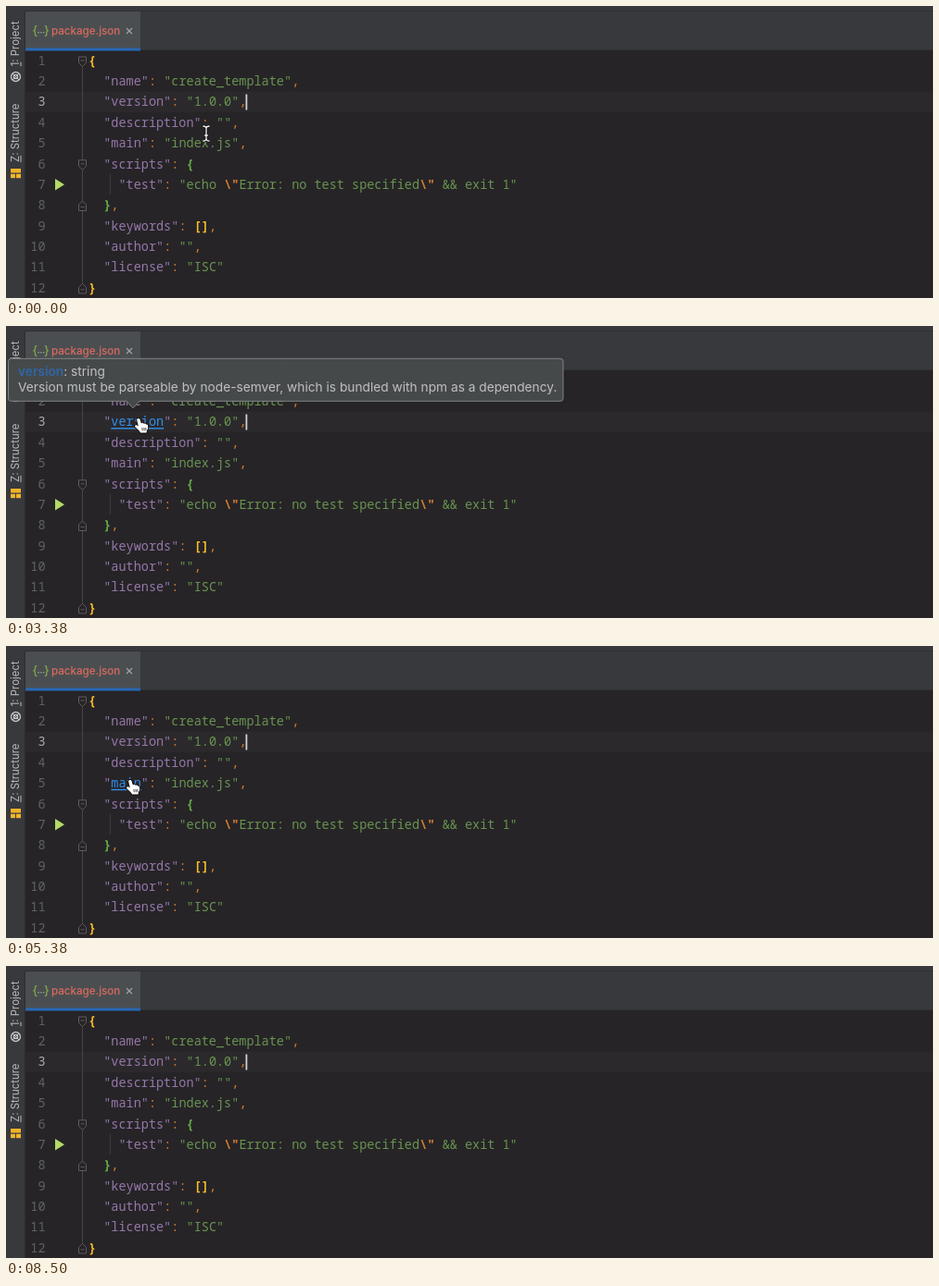
Animation, 1000 px wide and 316 px high, one loop 8.62 s. Source, as an HTML page with a canvas:

```html
<!DOCTYPE html>
<html lang="en">
<head>
<meta charset="utf-8">
<title>package.json</title>
<style>
html, body { margin: 0; width: 100%; height: 100%; overflow: hidden; background: #262427; }
canvas { display: block; width: 1000px; height: 316px; }
</style>
</head>
<body>
<canvas id="stage"></canvas>
<script>
const W = 1000, H = 316, LOOP = 8620, STEP = 125;
const COL0 = 89, PITCH = 8.12;
const mono = weight => `${weight} 13.53px "Noto Sans Mono", "DejaVu Sans Mono", monospace`;
const ui = (size, weight = 400) => `${weight} ${size}px Inter, Roboto, sans-serif`;

const C = {
  editor: '#262427', row: '#2b292c', panel: '#37393c', tab: '#4b4e51', edge: '#2b2c2e',
  accent: '#2668b5', key: '#9677aa', str: '#699450', punct: '#d47b30', gold: '#f5b92a',
  inner: '#63ab48', link: '#3190ec', num: '#606266', numOn: '#a9a9aa', fold: '#5c5b5e',
  side: '#b9bbbd', icon: '#c3c5c7', block: '#f0b429', tip: '#46494a', tipEdge: '#808283',
  tipKey: '#2e67a8', tipText: '#bfc0c1'
};

const LINES = [
  '{',
  '  "name": "create_template",',
  '  "version": "1.0.0",',
  '  "description": "",',
  '  "main": "index.js",',
  '  "scripts": {',
  '    "test": "echo \\"Error: no test specified\\" && exit 1"',
  '  },',
  '  "keywords": [],',
  '  "author": "",',
  '  "license": "ISC"',
  '}'
];

// Hovered keys: link time span, popup time span, popup geometry
const HOVERS = [
  { key: 'version', row: 3, from: 2000, to: 3750, tip: 2375, tipEnd: 3750, right: 601, arrow: 137, type: 'string',
    text: 'Version must be parseable by node-semver, which is bundled with npm as a dependency.' },
  { key: 'description', row: 4, from: 3875, to: 5000, tip: 4250, tipEnd: 5000, right: 479, arrow: 145, type: 'string',
    text: "This helps people discover your package, as it's listed in 'npm search'." },
  { key: 'main', row: 5, from: 5000, to: 6500, tip: 5500, tipEnd: 6500, right: 520, arrow: 137, type: 'string',
    text: 'The main field is a module ID that is the primary entry point to your program.' },
  { key: 'scripts', row: 6, from: 6500, to: 8250, tip: 6750, tipEnd: 8250, right: 1010, arrow: 137, type: 'object', tall: true,
    text: "The 'scripts' member is an object hash of script commands that are run at various times in the lifecycle of your package. The key is the lifecycle event, and the value is the command to run at that point." }
];

// time, x, y of the pointer tip
const PATH = [
  [0, 216, 138], [125, 216, 138], [1000, 143, 100], [3625, 143, 100], [4125, 142, 123], [4750, 142, 123],
  [4875, 137, 134], [5125, 134, 145], [6125, 134, 145], [6375, 133, 158], [6625, 134, 170], [LOOP, 134, 170]
];
const POINTER_END = 8375;

const canvas = document.getElementById('stage');
const g = canvas.getContext('2d');
const dpr = window.devicePixelRatio || 1;
canvas.width = W * dpr;
canvas.height = H * dpr;
g.scale(dpr, dpr);

const rowY = n => 59 + (n - 1) * 22.36;
const colX = n => COL0 + n * PITCH;

function rect(x, y, w, h, color) {
  g.fillStyle = color;
  g.fillRect(x, y, w, h);
}

function text(s, x, y, color, font, align = 'left') {
  g.font = font;
  g.fillStyle = color;
  g.textAlign = align;
  g.fillText(s, x, y);
  return g.measureText(s).width;
}

function line(points, color, width = 1, close = false) {
  g.beginPath();
  points.forEach(([x, y]) => g.lineTo(x, y));
  if (close) g.closePath();
  g.strokeStyle = color;
  g.lineWidth = width;
  g.stroke();
}

function code(s, col, row, color, weight = 500) {
  text(s, colX(col), rowY(row) + 4.7, color, mono(weight));
}

function drawKey(token, col, row, linked) {
  const word = token.slice(1, -1);
  if (word !== linked) return code(token, col, row, C.key);
  code('"', col, row, C.key);
  code(word, col + 1, row, C.link);
  code('"', col + 1 + word.length, row, C.key);
  rect(colX(col + 1), rowY(row) + 6.4, word.length * PITCH, 1.4, C.link);
}

function drawString(token, col, row) {
  for (const part of token.split(/(\\")/)) {
    if (part === '\\"') code(part, col, row, C.punct, 700);
    else code(part, col, row, C.str);
    col += part.length;
  }
}

function drawCode(linked) {
  let depth = 0;
  LINES.forEach((src, i) => {
    const row = i + 1;
    text(row, 42.5, rowY(row) + 4.7, row === 3 ? C.numOn : C.num, mono(row === 3 ? 500 : 400), 'right');
    for (const m of src.matchAll(/"(?:\\.|[^"\\])*"|[^\s"]/g)) {
      const tok = m[0], col = m.index;
      if (tok[0] === '"') {
        if (src[col + tok.length] === ':') drawKey(tok, col, row, linked);
        else drawString(tok, col, row);
      } else if ('{}'.includes(tok)) {
        if (tok === '}') depth--;
        code(tok, col, row, depth ? C.inner : C.gold, 700);
        if (tok === '{') depth++;
      } else if ('[]'.includes(tok)) {
        code(tok, col, row, C.gold, 700);
      } else {
        code(tok, col, row, C.punct);
      }
    }
  });
}

function drawFold(row, dir) {
  const x = 82.5, y = rowY(row) + 1;
  const shape = [[-4, -5], [4, -5], [4, 1.5], [0, 5.5], [-4, 1.5]].map(([a, b]) => [x + a, y + b * dir]);
  g.beginPath();
  shape.forEach(p => g.lineTo(...p));
  g.fillStyle = C.editor;
  g.fill();
  line(shape, C.fold, 1, true);
  line([[x - 2, y - dir], [x + 2, y - dir]], C.fold);
}

function drawGutter() {
  line([[82.5, 60], [82.5, 305]], '#454447');
  [1, 6].forEach(r => drawFold(r, 1));
  [8, 12].forEach(r => drawFold(r, -1));
  g.beginPath();
  g.moveTo(53, 187);
  g.lineTo(63, 193.3);
  g.lineTo(53, 199.6);
  g.fillStyle = '#b4da68';
  g.fill();
  line([[112.5, 182], [112.5, 204]], '#3b3a3d');
}

function sideLabel(s, y) {
  g.save();
  g.translate(14, y);
  g.rotate(-Math.PI / 2);
  text(s, 0, 0, C.side, ui(11.4));
  rect(0, 1.5, g.measureText(s[0]).width, 1, C.side);
  g.restore();
}

function drawSidebar() {
  rect(0, 0, 20, H, C.panel);
  rect(20, 6, 1, H, C.edge);
  sideLabel('1: Project', 65.3);
  sideLabel('Z: Structure', 169);
  g.beginPath();
  g.arc(10.5, 76.5, 5, 0, Math.PI * 2);
  g.strokeStyle = C.icon;
  g.lineWidth = 1.3;
  g.stroke();
  g.strokeRect(8.5, 74.5, 4, 4);
  line([[7, 73], [14, 80]], C.icon);
  line([[14, 73], [7, 80]], C.icon);
  rect(5, 176, 11, 4.5, C.block);
  rect(5, 181.7, 5, 4.5, C.block);
  rect(11, 181.7, 5, 4.5, C.block);
}

function drawTabs() {
  rect(0, 0, W, 48, C.panel);
  rect(0, 5, W, 1, '#2f3133');
  rect(21, 6, 124, 42, C.tab);
  rect(145, 47, W, 1, '#303235');
  rect(21, 45.5, 124, 3, C.accent);
  text('{', 28.5, 31, '#7fa84c', ui(13, 500));
  text('}', 41, 31, '#7fa84c', ui(13, 500));
  [35, 37.8, 40.6].forEach(x => rect(x - 0.6, 28, 1.3, 1.3, '#a5aaa0'));
  text('package.json', 49, 31, '#dc6a5f', ui(11.6, 500));
  line([[130, 24], [136, 30]], '#a4a7a9', 1.1);
  line([[136, 24], [130, 30]], '#a4a7a9', 1.1);
}

function drawTip({ key, row, right, arrow, type, tall, text: body }) {
  const bottom = rowY(row) - 22.4, top = bottom - (tall ? 62.5 : 46), r = 3, left = 2.5;
  g.beginPath();
  g.moveTo(left + r, top);
  g.arcTo(right, top, right, bottom, r);
  g.arcTo(right, bottom, left, bottom, r);
  g.lineTo(arrow + 7, bottom);
  g.lineTo(arrow, bottom + 7.5);
  g.lineTo(arrow - 7, bottom);
  g.arcTo(left, bottom, left, top, r);
  g.arcTo(left, top, right, top, r);
  g.closePath();
  g.fillStyle = C.tip;
  g.fill();
  g.strokeStyle = C.tipEdge;
  g.lineWidth = 1;
  g.stroke();
  const w = text(key, 13, top + 19, C.tipKey, ui(13.72, 600));
  text(': ' + type, 13 + w, top + 19, C.tipText, ui(13.72));
  text(body, 13, top + 35.3, C.tipText, ui(13.72));
}

const HAND = new Path2D(
  'M-1.8 1.8C-2-.4 1-.8 1.6 1.2L2.9 5.4C4 4.4 5.4 4.8 5.7 5.9C6.7 5.2 7.8 5.6 8.1 6.6' +
  'C9.2 6.1 10 6.8 10.1 8C10.4 10.6 9.8 12.2 9 13.2L8.6 15.5L2 15.5C1.4 13.4-1.5 11.8-3.6 9.2' +
  'C-4.6 7.6-3 6.6-1.6 7.6L-.2 8.6Z'
);
const BEAM = new Path2D('M-3.5-8Q0-8 0-5.5Q0-8 3.5-8M0-5.5V5.5M-3.5 8Q0 8 0 5.5Q0 8 3.5 8M-1.8 2H1.8');

function drawPointer(t, hand) {
  const i = Math.max(1, PATH.findIndex(p => p[0] >= t));
  const [t0, x0, y0] = PATH[i - 1], [t1, x1, y1] = PATH[i];
  const k = (t - t0) / (t1 - t0), e = k * k * (3 - 2 * k);
  g.save();
  g.translate(x0 + (x1 - x0) * e, y0 + (y1 - y0) * e);
  g.lineJoin = 'round';
  if (hand) {
    g.strokeStyle = '#0b0b0b';
    g.lineWidth = 1.8;
    g.stroke(HAND);
    g.fillStyle = '#fff';
    g.fill(HAND);
    [4.2, 6.2, 8].forEach(x => line([[x - 0.3, 10], [x, 13.3]], '#222', 0.8));
  } else {
    [['#111', 3], ['#f4f4f4', 1.3]].forEach(([color, width]) => {
      g.strokeStyle = color;
      g.lineWidth = width;
      g.stroke(BEAM);
    });
  }
  g.restore();
}

function draw(t) {
  const hover = HOVERS.find(h => t >= h.from && t < h.to);
  const tip = HOVERS.find(h => t >= h.tip && t < h.tipEnd);
  rect(0, 0, W, H, C.editor);
  rect(21, 92.5, W, 22.5, C.row);
  drawTabs();
  drawSidebar();
  drawGutter();
  drawCode(hover && hover.key);
  rect(258.5, 95.5, 1.8, 17, '#d0d0d0');
  if (tip) drawTip(tip);
  if (t < POINTER_END) drawPointer(t, t >= 2000 && t < 8250);
}

function tick() {
  const t = performance.now() % LOOP;
  draw(Math.floor(t / STEP) * STEP);
  requestAnimationFrame(tick);
}
tick();
</script>
</body>
</html>
```
